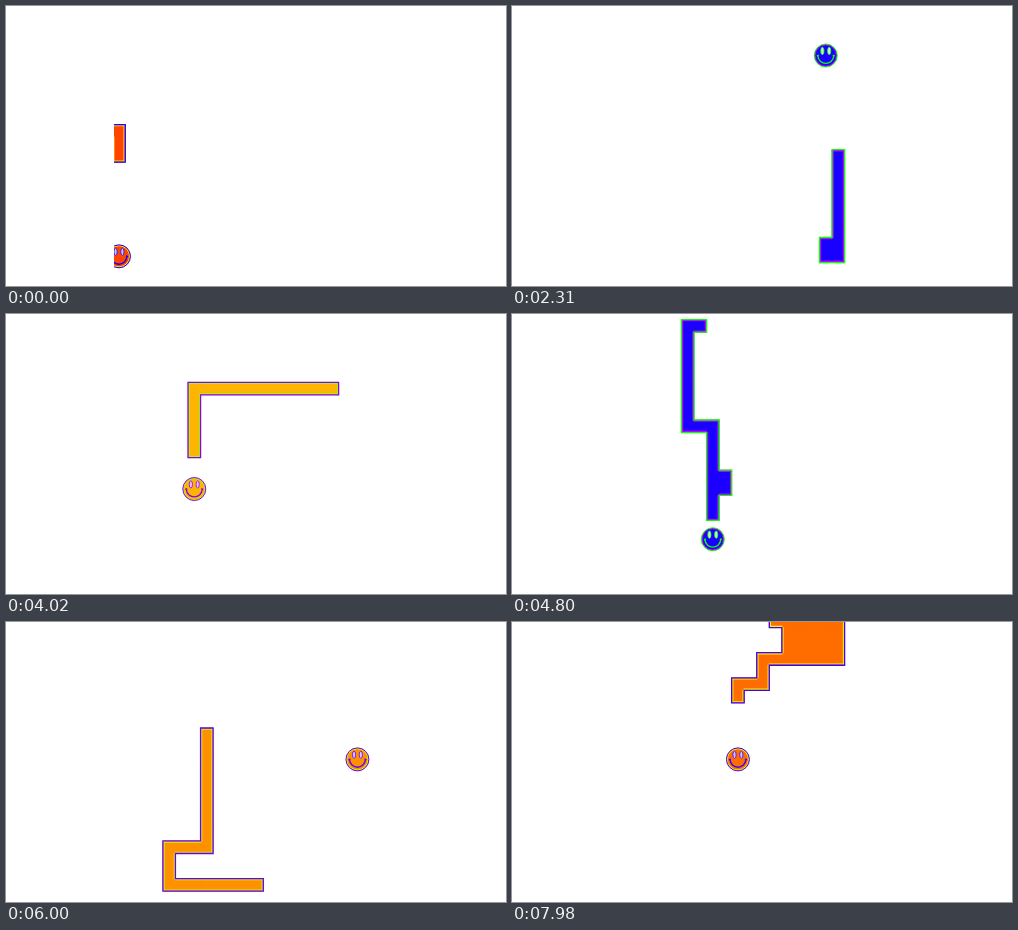
An HTML page for the animation above (8000 ms loop, 500 by 280 pixels).

```html
<!DOCTYPE html>
<html lang="en">
<head>
<meta charset="utf-8">
<title>Rainbow snake</title>
<style>
  html, body { margin: 0; width: 100%; height: 100%; overflow: hidden; background: #fff; }
  svg { display: block; width: 500px; height: 280px; }
</style>
</head>
<body>
<svg viewBox="0 0 500 280">
  <clipPath id="field"><rect x="108" y="0" width="392" height="280"/></clipPath>
  <g clip-path="url(#field)" fill="none">
    <path id="body" stroke-width=".5"/>
    <path id="inner" stroke-width="1.1" stroke-linecap="square"/>
    <path id="outer" stroke-width="1.3" stroke-linecap="square"/>
    <g id="face">
      <circle class="main" r="11.3"/>
      <circle class="warm" r="10.6" stroke-width="1"/>
      <circle class="edge" r="11.5" stroke-width="1"/>
      <ellipse class="edge eye" cx="-3.4" cy="-4.6" rx="1.6" ry="3.6" stroke-width=".8"/>
      <ellipse class="edge eye" cx="3.4" cy="-4.6" rx="1.6" ry="3.6" stroke-width=".8"/>
      <path class="edge" d="M-9 .4L-7 -.4M9 .4L7 -.4M-8 .2C-7 10.4 7 10.4 8 .2" stroke-width="1.4"/>
    </g>
  </g>
</svg>
<script>
const LOOP = 8000, TICK = 30, CELL = 12.55, LEFT = 106.7, TOP = -6.95, START_LENGTH = 4;
const $ = id => document.getElementById(id);
const parse = s => s.trim().split(/\s+/).map(p => p.split(',').map(Number));

// Corners of the snake's route, as column,row
const corners = parse(`
  -1,10 0,10 0,20 9,20 9,7 1,7 1,16 5,16 5,17 6,17
  6,3 12,3 12,10 17,10 17,20 16,20 16,4 18,4 18,21 14,21
  14,14 17,14 17,6 6,6 6,14 2,14 2,16 7,16 7,14 8,14 8,13 7,13 7,9 5,9 5,1 6,1
  6,-9 7,-9 7,18 4,18 4,21 19,21 19,11 8,11 8,10 9,10 9,4
  17,4 17,1 12,1 12,0 17,0 17,1 13,1 13,2 17,2 17,3 11,3 11,5 9,5 9,6`);

const foods = parse(`
  0,20 9,7 1,12 6,17 6,3 12,10 17,20 16,4 18,12 18,21
  14,14 17,6 11,6 6,14 2,16 8,14 6,1 7,18 4,21
  19,11 8,11 9,5 16,4 14,2 9,11`);

// Time in ms, head position along the route
const pace = parse('0,3 1380,61 3210,138 4800,206 6000,257 6870,296 7980,338');

const route = [corners[0]];
for (const [c, r] of corners.slice(1)) {
  let [x, y] = route[route.length - 1];
  while (x !== c || y !== r) {
    x += Math.sign(c - x);
    y += Math.sign(r - y);
    route.push([x, y]);
  }
}

let last = 3;
const eaten = foods.map(([c, r]) => {
  const i = route.findIndex((p, n) => n > last && p[0] === c && p[1] === r);
  return last = i < 0 ? Infinity : i;
});

function headAt(t) {
  let i = 1;
  while (i < pace.length - 1 && t > pace[i][0]) i++;
  const [t0, d0] = pace[i - 1], [t1, d1] = pace[i];
  const d = d0 + (d1 - d0) * (t - t0) / (t1 - t0);
  return Math.min(route.length - 1, Math.floor(d + 1e-6));
}

const f = n => n.toFixed(2);
const line = (x1, y1, x2, y2) => `M${f(x1)} ${f(y1)}L${f(x2)} ${f(y2)}`;

// Open sides of all cells, moved inwards by k
function outline(cells, k) {
  const used = new Set(cells.map(String));
  let d = '';
  for (const [c, r] of cells) {
    const x1 = LEFT + c * CELL, y1 = TOP + r * CELL, x2 = x1 + CELL, y2 = y1 + CELL;
    const open = (dc, dr) => !used.has(`${c + dc},${r + dr}`);
    if (open(0, -1)) d += line(x1, y1 + k, x2, y1 + k);
    if (open(0, 1)) d += line(x1, y2 - k, x2, y2 - k);
    if (open(-1, 0)) d += line(x1 + k, y1, x1 + k, y2);
    if (open(1, 0)) d += line(x2 - k, y1, x2 - k, y2);
  }
  return d;
}

function paint(selector, attr, colour) {
  for (const el of document.querySelectorAll(selector)) el.setAttribute(attr, colour);
}

function draw(time) {
  const t = Math.floor(time % LOOP / TICK) * TICK;
  const head = headAt(t);
  const score = eaten.filter(n => n <= head).length;
  const tail = Math.max(0, head + 1 - START_LENGTH - score);
  const cells = route.slice(tail, head + 1);

  $('body').setAttribute('d', cells.map(([c, r]) =>
    `M${f(LEFT + c * CELL)} ${f(TOP + r * CELL)}h${CELL}v${CELL}h${-CELL}z`).join(''));
  $('inner').setAttribute('d', outline(cells, 1.2));
  $('outer').setAttribute('d', outline(cells, 0));

  const [c, r] = foods[Math.min(score, foods.length - 1)];
  $('face').setAttribute('transform',
    `translate(${f(LEFT + (c + .5) * CELL)} ${f(TOP + (r + .5) * CELL)})`);

  const hue = 16 + t * .723;
  const tone = (shift, light = 50) => `hsl(${f((hue + shift) % 360)} 100% ${light}%)`;
  paint('#body, .main', 'fill', tone(0));
  paint('#body', 'stroke', tone(0));
  paint('#inner, .warm', 'stroke', tone(40));
  paint('#outer, .edge', 'stroke', tone(230));
  paint('.eye', 'fill', tone(230, 88));
}

const begin = performance.now();
function loop() {
  draw(performance.now() - begin);
  requestAnimationFrame(loop);
}
loop();
</script>
</body>
</html>
```
